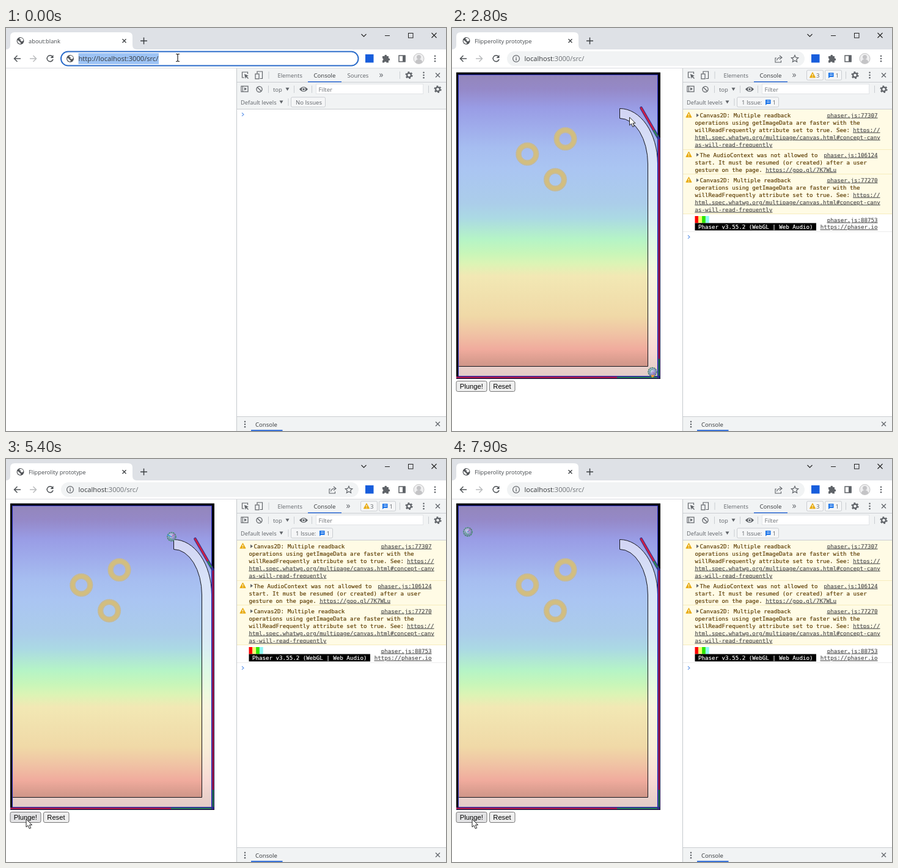
An HTML page that plays this animation: 720x658 px, repeating every 8000 ms.

```html
<!DOCTYPE html>
<html lang="en">
<head>
<meta charset="utf-8">
<title>Pinball prototype</title>
<style>
html, body { margin: 0; width: 100%; height: 100%; overflow: hidden; background: #fff; }
svg { display: block; width: 100vw; height: 100vh; }
text { font-family: "Open Sans", "Noto Sans", sans-serif; white-space: pre; }
.mono { font-family: "DejaVu Sans Mono", monospace; font-size: 9.16px; stroke-width: .18; }
.btn { font-family: "Liberation Sans", sans-serif; font-size: 11.2px; }
.link { text-decoration: underline; }
</style>
</head>
<body>
<svg id="stage" viewBox="0 0 720 658" xmlns="http://www.w3.org/2000/svg"></svg>
<script>
const stage = document.getElementById('stage');
const GREY = '#5f6368', INK = '#333639', BLUE = '#1a73e8', BROWN = '#5c3c00', LINK = '#505050';

const rect = (x, y, w, h, fill, more = '') =>
  `<rect x="${x}" y="${y}" width="${w}" height="${h}" fill="${fill}" ${more}/>`;
const circle = (x, y, r, fill, more = '') =>
  `<circle cx="${x}" cy="${y}" r="${r}" fill="${fill}" ${more}/>`;
const ring = (x, y, r, color, w, more = '') =>
  circle(x, y, r, 'none', `stroke="${color}" stroke-width="${w}" ${more}`);
const line = (d, color, w = 1, more = '') =>
  `<path d="${d}" fill="none" stroke="${color}" stroke-width="${w}" ${more}/>`;
const shape = (d, fill, more = '') => `<path d="${d}" fill="${fill}" ${more}/>`;
const text = (x, y, s, size = 9.5, color = INK, more = '') =>
  `<text x="${x}" y="${y}" font-size="${size}" fill="${color}" ${more}>${s}</text>`;
const mono = (x, y, s, color = BROWN, more = 'class="mono"') =>
  `<text x="${x}" y="${y}" fill="${color}" stroke="${color}" ${more}>${s}</text>`;
const link = (x, y, s) => mono(x, y, s, LINK, 'class="mono link"');
const linkEnd = (y, s) => mono(696.5, y, s, LINK, 'class="mono link" text-anchor="end"');
const group = (id, body) => `<g id="${id}">${body}</g>`;

const globe = (x, y) => circle(x, y, 6, '#505357') +
  shape(`M${x - 5} ${y - 1}l3 1 1 2 2 1-1 2q-5-1-5-6zM${x} ${y - 5}q4 0 5 4l-2 2-3-1 1-2-3-1z`, '#fff');
const cross = (x, y, r, color = GREY, w = 1.3) =>
  line(`M${x - r} ${y - r}l${2 * r} ${2 * r}m0 ${-2 * r}l${-2 * r} ${2 * r}`, color, w);
const dots = (x, y, gap = 4.2, color = GREY) =>
  [-1, 0, 1].map(i => circle(x, y + i * gap, 1.25, color)).join('');
const gear = (x, y) => ring(x, y, 3.4, GREY, 2.2) + ring(x, y, 5.2, GREY, 1.8, 'stroke-dasharray="2.7 2.745"');
const bar = (x, y, h = 12) => line(`M${x} ${y - h / 2}v${h}`, '#cacdd1');
const drop = (x, y) => shape(`M${x - 3} ${y - 2.5}h6l-3 5z`, GREY);
const warn = (x, y) => shape(`M${x} ${y - 4.5}l4.6 8.4h-9.2z`, '#e8ab12',
  'stroke="#e8ab12" stroke-linejoin="round"') + line(`M${x} ${y - 2}v3m0 1v1.2`, '#fff', 1.1);
const chat = (x, y) => shape(`M${x - 4} ${y - 4}h8.5v7h-6l-2.5 2z`, BLUE) +
  line(`M${x - 2} ${y - 2}h5m-5 2.4h5`, '#fff', 0.8);
const badge = (x, y, w) => rect(x, y, w, 16, '#f5f6f7', 'rx="2" stroke="#cacdd1"');

function browser() {
  return rect(0, 0, 720, 658, '#fff') + rect(0, 0, 720, 35, '#dee1e6') +
    shape('M0 35q7 0 7-7V14q0-7 7-7H200q7 0 7 7v14q0 7 7 7z', '#fff') +
    globe(23.5, 21) + cross(193.5, 21, 3, '#3c4043') +
    line('M225.500 15.500v11m-5.500-5.500h11', '#3c4043', 1.5) +
    line('M581.500 10l4 4 4-4M620 12.500h8', '#222', 1.1) +
    rect(658.5, 8.5, 7.5, 7.5, 'none', 'stroke="#222"') + cross(700.5, 12, 4, '#222', 1.1) +
    line('M0 65.500h720', '#dadce0') +
    line('M24 50H13.500m5-5l-5 5 5 5', '#4f5357', 1.5) +
    line('M39 50h10.500m-5-5l5 5-5 5', '#babcbe', 1.5) +
    line('M76 46.500a5 5 0 1 0 1 4.500', '#4f5357', 1.5) + shape('M77.500 44v5h-5z', '#4f5357') +
    rect(588, 43, 13.5, 13.5, '#175ddc') +
    shape('M616 46h3.500a1.800 1.800 0 1 1 3.500 0h3v3.500a1.800 1.800 0 1 1 0 3.500v3.500h-3.500a1.800 1.800 0 0 0-3.500 0H616v-3.500a1.800 1.800 0 0 0 0-3.500z', GREY) +
    rect(643, 45, 10, 10, 'none', `stroke="${GREY}" stroke-width="1.5"`) + rect(649, 45, 4.5, 10, GREY) +
    circle(675.5, 50, 8.5, '#efeff0', 'stroke="#b5b5b6" stroke-width=".8"') +
    circle(675.5, 47.5, 3.5, '#c4c4c6') + shape('M669.500 56q1-5 6-5t6 5q-6 4.500-12 0z', '#c4c4c6') +
    dots(702, 50);
}

function address() {
  const focus = rect(90, 38.5, 486.5, 23, '#fff', 'rx="11.500" stroke="#2a6bc9" stroke-width="2"') + globe(105, 50);
  return group('blank', text(37, 24.5, 'about:blank', 9.35, '#45494d') + focus +
      group('picked', rect(118.5, 41, 131.5, 18, '#9dc3f5') + text(118.5, 54, 'http://localhost:3000/src/', 11.13)) +
      group('typed', text(118.5, 54, `http://<tspan fill="${INK}">localhost</tspan>:3000/src/`, 11.13, '#6b6f74'))) +
    group('visited', text(37, 24.5, 'Flipperolity prototype', 9.35, '#45494d') +
      rect(90, 38, 487, 24, '#f1f3f4', 'rx="12"') +
      ring(105, 50, 5.4, GREY, 1.2) + line('M105 49v4m0-6v1.300', GREY, 1.3) +
      text(118.5, 54, `<tspan fill="${INK}">localhost</tspan>:3000/src/`, 11.08, '#6b6f74') +
      line('M531 49h-2v7h9.500v-3M531.500 53q1-5 7-5m-2.500-3l4 3.200-4 3', GREY, 1.1) +
      shape('M561 44.500l1.700 3.700 4 .4-3 2.700.9 4-3.600-2.100-3.600 2.100.9-4-3-2.700 4-.4z', 'none', `stroke="${GREY}" stroke-width="1.200"`));
}

function devtools() {
  return rect(377, 66, 343, 592, '#fff') + rect(377, 66, 343, 66, '#f1f3f4') +
    rect(377, 635, 343, 23, '#f1f3f4') + line('M377.500 66v592', '#c4c8cc') +
    line('M378 88.500h342M378 132.500h342M378 634.500h342', '#cacdd1') +
    line('M390 81h-3.500v-9h9v3', GREY, 1.2) + shape('M390 75l7 3-3 1 3 3-1 1-3-3-1.200 3z', GREY) +
    line('M411 74.500v-3.500h8.500v11.500h-4', GREY, 1.2) + rect(408, 75, 6, 8, 'none', `stroke="${GREY}" stroke-width="1.200"`) +
    bar(430, 77) + text(444.5, 80.5, 'Elements', 9.4, GREY) + text(503.5, 80.5, 'Console', 9.6) +
    rect(494, 87, 55, 1.6, '#3b74d8') +
    bar(644.5, 77) + gear(659.5, 77) + dots(683.5, 77) + cross(706.5, 77, 3.5) +
    rect(385, 95, 11, 9, 'none', `stroke="${GREY}" stroke-width="1.200"`) + line('M387.500 95v9', GREY) + shape('M390 97l4 2.500-4 2.500z', GREY) +
    ring(414.5, 100, 4.6, GREY, 1.3) + line('M411.300 96.800l6.400 6.400', GREY, 1.3) +
    bar(429.5, 100) + text(437, 103.5, 'top', 9.5, GREY) + drop(460.5, 100) + bar(471.5, 100) +
    shape('M480 100q7-8 14 0q-7 8-14 0z', GREY) + ring(487, 100, 2.4, '#f1f3f4', 1.2) +
    bar(500.5, 100) + rect(507.5, 91.5, 175, 16, '#fff', 'stroke="#e2e4e7"') + text(511.5, 103.5, 'Filter', 9.6, '#6a6e73') +
    bar(691.5, 100) + gear(706.5, 100) +
    text(384, 125, 'Default levels', 9.4, GREY) + drop(450.5, 121) + bar(462, 121) +
    dots(391, 647) + text(408, 650.5, 'Console', 9.6) + rect(401, 656, 51.5, 2, '#3b74d8') + cross(706.5, 646.5, 3.5);
}

function idlePanel() {
  return text(558.5, 80.5, 'Sources', 9.5, GREY) + text(610.5, 81, '»', 14, GREY) +
    badge(466.5, 113, 56) + text(474, 125, 'No Issues', 9.55, GREY) +
    line('M386 138.500l3 2.700-3 2.700', '#5d94e8', 1.1);
}

function canvasWarning(y, place) {
  const href = (i, s, x = 397.5) => link(x, y + 12 * i, s);
  return warn(387.5, y - 3.5) + shape(`M400 ${y - 6}l4 3-4 3z`, GREY) +
    mono(405.5, y, 'Canvas2D: Multiple readback') + linkEnd(y, place) +
    mono(397.5, y + 12, 'operations using getImageData are faster with the') +
    mono(397.5, y + 24, 'willReadFrequently attribute set to true. See: ') + href(2, 'https://', 656.3) +
    href(3, 'html.spec.whatwg.org/multipage/canvas.html#concept-canv') + href(4, 'as-will-read-frequently');
}

function log() {
  const stripes = ['#ff0000', '#f4ff70', '#2ee600', '#8ff7f4']
    .map((c, i) => rect(397.5 + i * 5.8, 307, 5.8, 11.5, c)).join('');
  return text(556.5, 81, '»', 14, GREY) +
    badge(580.5, 69, 27) + warn(590, 77) + text(596, 80.5, '3', 9.5, GREY) +
    badge(610.5, 69, 27) + chat(620, 77) + text(627.5, 80.5, '1', 9.5, GREY) +
    badge(466.5, 113, 68) + text(474, 125, '1 Issue:', 9.5, GREY) + chat(517, 121) + text(524.5, 125, '1', 9.5, GREY) +
    rect(378, 133, 342, 170.5, '#fffbe5') + line('M378 198.500h342M378 238.500h342M378 303.500h342', '#f6ecbd') +
    canvasWarning(145.5, 'phaser.js:77307') +
    warn(387.5, 206.5) + shape('M400 204l4 3-4 3z', GREY) +
    mono(405.5, 210.5, 'The AudioContext was not allowed to') + linkEnd(210.5, 'phaser.js:106124') +
    mono(397.5, 222.5, 'start. It must be resumed (or created) after a user') +
    mono(397.5, 234.5, 'gesture on the page. ') + link(513.2, 234.5, 'https://goo.gl/7K7WLu') +
    canvasWarning(251.5, 'phaser.js:77270') +
    stripes + linkEnd(316.5, 'phaser.js:88753') + rect(397.5, 318.5, 198.5, 12, '#000') +
    mono(403, 328, 'Phaser v3.55.2 (WebGL | Web Audio)', '#fff') + linkEnd(328, 'https://phaser.io') +
    line('M378 332.500h342', '#ececec') + line('M386 338.500l3 2.700-3 2.700', '#5d94e8', 1.1);
}

const sky = [[76, '9386bb'], [100, '9589c8'], [130, '999ce5'], [160, '9fabeb'], [195, 'a6bdf0'], [230, 'aac5f2'],
  [285, 'abcdea'], [310, 'abd9e4'], [345, 'b5f4c6'], [368, 'c8f6b9'], [385, 'dcf4b5'], [405, 'f2e8b4'],
  [470, 'f0d9a7'], [500, 'f0c2a4'], [525, 'f0ab9d'], [545, 'd79b8d'], [568, 'bf8b7f']];
const defs = `<defs><linearGradient id="sky" gradientUnits="userSpaceOnUse" x1="0" y1="76" x2="0" y2="568">${
  sky.map(([y, c]) => `<stop offset="${(y - 76) / 492}" stop-color="#${c}"/>`).join('')
}</linearGradient><radialGradient id="orb" cx=".42" cy=".38"><stop offset="0" stop-color="#ced3ee"/><stop offset="1" stop-color="#7f80bb"/></radialGradient></defs>`;

const bumper = (x, y) => ring(x, y, 14.3, '#c9bb93', 9) + ring(x, y, 14.3, '#d3be7e', 5) +
  ring(x, y, 18.6, '#c4b995', 1, 'stroke-dasharray="1.500 1.500"');

function table() {
  const lane = 'M274.500 131.500A62 90 0 0 1 336.500 221V568H11V552.500H320.500V222A46 75 0 0 0 274.500 147.500Z';
  return rect(11, 76, 326, 492, 'url(#sky)') +
    bumper(123.3, 205.8) + bumper(185.5, 181) + bumper(169, 247.7) +
    shape(lane, '#fff', 'fill-opacity=".56"') +
    line('M336.500 221A62 90 0 0 0 274.500 131.500V147.500A46 75 0 0 1 320.500 222V552.500H11', '#15151c') +
    line('M10.500 568V76.500H336.500V568.500H10.500', '#2a2fc4', 1.1) +
    line('M338.800 179V572M7 570.500H340.500', '#30298c', 3.4) +
    line('M338.800 179V540M7 570.500H270', '#c8143c', 1.9) +
    line('M338.800 540V568M270 570.500H336', '#1f9a3c', 1.5) +
    line('M309.500 130.500L338 180', '#34318e', 4.6, 'stroke-linecap="round"') +
    line('M309.500 130.500L330 166', '#d11f42', 2.6, 'stroke-linecap="round"') +
    line('M330 167L336 177', '#2d9b46', 2);
}

const button = (x, w, label, id) =>
  rect(x, 576.5, w, 17, '#efefef', `rx="2.500" stroke="#767676" ${id ? `id="${id}"` : ''}`) +
  `<text class="btn" x="${x + 5.8}" y="589" fill="#000">${label}</text>`;

const ball = group('ball', circle(0, 0, 7, 'url(#orb)') + ring(0, 0, 7, '#3f8f63', 1.4, 'stroke-dasharray="2.500 1"') +
  group('spin', line('M0 0L5 5', '#b04fae') + line('M-4 2A4.500 4.500 0 0 1 1 -4', '#57b287', 1.3)) +
  line('M-2 6.500H3M0 5V9', '#ef9a38', 2.6, 'id="glow"') + line('', '#2496e6', 1.4, 'id="speed"'));

stage.innerHTML = defs + browser() + address() +
  group('page', rect(7, 72.5, 334, 500.5, '#000') + group('game', table() + ball) +
    button(7, 50, 'Plunge!', 'plunge') + button(61.5, 41.5, 'Reset')) +
  devtools() + group('idle', idlePanel()) + group('log', log()) +
  group('beam', line('M278 42.500h2l1 1 1-1h2M281 43.500v10m-3 1h2l1-1 1 1h2', '#222', 1.2)) +
  group('arrow', shape('M0 0V13L3 10.300L5.200 15.500L7.600 14.500L5.400 9.500H9.500Z', '#fff', 'stroke="#222" stroke-width="1"'));

const $ = id => document.getElementById(id);
const show = (id, on) => $(id).setAttribute('display', on ? 'inline' : 'none');
const ease = (t, a, b) => {
  const p = Math.min(1, Math.max(0, (t - a) / (b - a)));
  return p * p * (3 - 2 * p);
};

// Pixels and seconds; free fall at 600 px per second squared.
const LAUNCH = 4.42, DEFLECT = 5.13, WALL = 6.59, FLOOR = 6.77;
const arc = (t, peak, top) => [top + 300 * (t - peak) ** 2, 600 * (t - peak)];

function ballAt(t) {
  if (t < LAUNCH) return { x: 328, y: 561.5, vx: 0, vy: 0 };
  if (t < DEFLECT) {
    const s = t - LAUNCH;
    return { x: 328, y: 561.5 - 758 * s + 300 * s * s, vx: 0, vy: 600 * s - 758 };
  }
  const [y, vy] = t < FLOOR ? arc(t, 5.557, 119.5) : arc(t, 7.983, 117);
  const vx = t < WALL ? -212 : 5.3;
  const x = t < WALL ? 271 + vx * (t - 5.4) : 19 + vx * (t - WALL);
  return { x, y, vx, vy };
}

function draw(ms) {
  const t = ms / 1000;
  show('picked', ms < 600);
  show('typed', ms >= 600);
  show('blank', ms < 1600);
  show('visited', ms >= 1600);
  show('idle', ms < 1800);
  show('log', ms >= 1800);
  show('page', ms >= 1800);
  show('game', ms >= 2500);

  const b = ballAt(t);
  $('ball').setAttribute('transform', `translate(${b.x} ${b.y})`);
  $('speed').setAttribute('d', `M0 0L${b.vx * 0.032} ${b.vy * 0.032}`);
  $('spin').setAttribute('transform', `rotate(${(328 - b.x) * -1.5})`);
  show('glow', t < LAUNCH);

  const down = ease(t, 2.6, 3.3), over = ease(t, 3.8, 4.3);
  const cx = 281 + 48 * down - 296 * over, cy = 48 + 493.5 * down + 46.5 * over;
  show('beam', down === 0);
  show('arrow', down > 0);
  $('arrow').setAttribute('transform', `translate(${cx} ${cy})`);
  $('plunge').setAttribute('fill', over === 1 ? '#e2e2e4' : '#efefef');
}

const start = performance.now();
function tick(now) {
  draw(Math.floor((Math.max(0, now - start) % 8000) / 100) * 100);
  requestAnimationFrame(tick);
}
draw(0);
requestAnimationFrame(tick);
</script>
</body>
</html>
```
